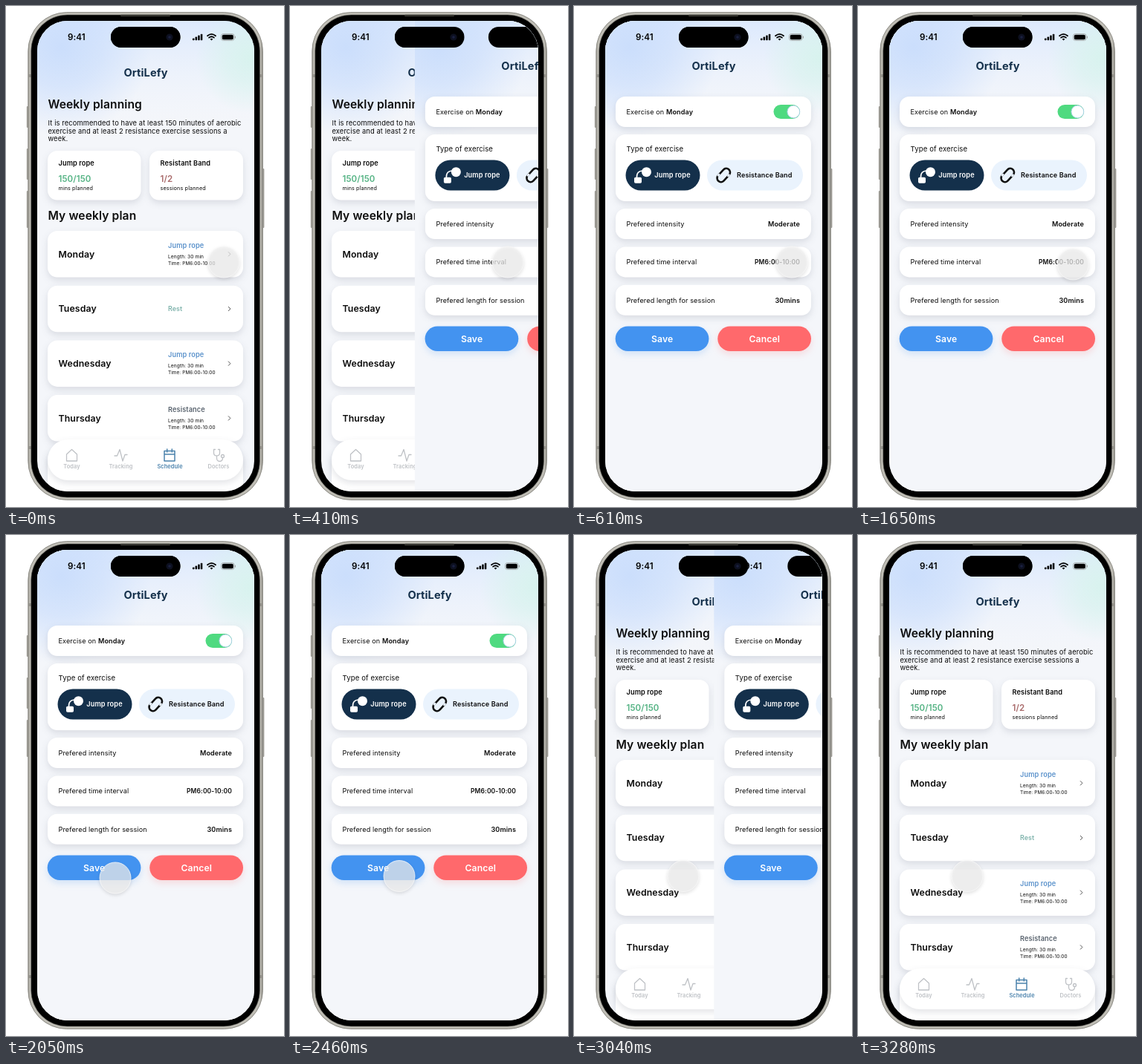
An HTML page that plays this animation: 374 px wide and 675 px high, repeating every 4.53 s.

```html
<!DOCTYPE html>
<html lang="en">
<head>
<meta charset="utf-8">
<title>Weekly exercise planner</title>
<style>
html, body { margin: 0; width: 100%; height: 100%; overflow: hidden; background: #fff; }
svg { display: block; font-family: Inter, "Open Sans", sans-serif; letter-spacing: .1px; }
.card { fill: #fff; filter: drop-shadow(0 4px 5px rgba(40, 50, 70, .13)); }
.line { fill: none; stroke-linecap: round; stroke-linejoin: round; }
#cursor { filter: drop-shadow(0 2px 2px rgba(0, 0, 0, .15)); }
</style>
</head>
<body>
<svg id="stage" width="374" height="675" viewBox="0 0 374 675"></svg>
<script>
const LOOP = 4530, STEP = 40, WIDTH = 292;
const NAVY = '#14304b', GREY = '#bfc2c6', BLUE = '#4b82ac';

const rect = (x, y, w, h, r, fill, extra = '') =>
  `<rect x="${x}" y="${y}" width="${w}" height="${h}" rx="${r}" fill="${fill}" ${extra}/>`;
const card = (x, y, w, h, r = 13) => rect(x, y, w, h, r, '#fff', 'class="card"');
const line = (d, color, width) =>
  `<path class="line" d="${d}" stroke="${color}" stroke-width="${width}"/>`;
const text = (x, y, s, size, weight = 400, fill = '#0c0c0c', anchor = 'start') =>
  `<text x="${x}" y="${y}" font-size="${size}" font-weight="${weight}" fill="${fill}" text-anchor="${anchor}">${s}</text>`;

const island = rect(141, 28, 93.5, 28, 14, '#000');

function backdrop() {
  return rect(42, 20, WIDTH, 634, 0, '#f4f6fa') +
    ['top', 'blue', 'mint'].map(id => rect(42, 20, WIDTH, 200, 0, `url(#${id})`)).join('');
}

function statusBar() {
  const bars = [0, 1, 2, 3].map(i =>
    rect(251 + i * 3.6, 43.4 - i * 1.9, 2.5, 2.8 + i * 1.9, .8, '#000')).join('');
  const wifi = line('M271 40.2Q276.5 35.6 282 40.2M273.1 42.6Q276.5 39.9 279.9 42.6', '#000', 1.8) +
    '<path d="M274.6 44.4Q276.5 43 278.4 44.4L276.5 46.4Z"/>';
  const battery = rect(289.6, 37.6, 17.4, 8.8, 2.7, 'none', 'stroke="#999" stroke-width=".8"') +
    rect(290.8, 38.8, 15, 6.4, 1.7, '#000') + rect(307.8, 40.6, 1, 2.8, .5, '#999');
  return text(83, 46, '9:41', 11.6, 600, '#000') + bars + wifi + battery + island;
}

const title = y => text(188, y, 'OrtiLefy', 14.6, 700, NAVY, 'middle');

function dayRow([day, kind, color], i) {
  const y = 303 + i * 73.7;
  const plan = kind === 'Rest'
    ? text(218, y + 34.5, kind, 8.9, 600, color)
    : text(218, y + 23, kind, 9.2, 600, color) +
      text(218, y + 36.5, 'Length: 30 min', 6.6) +
      text(218, y + 46, 'Time: PM6:00-10:00', 6.4);
  return card(56, y, 263, 62.5) + text(70.5, y + 35.6, day, 12.3, 600) + plan +
    line(`M299.3 ${y + 28.6}l2.6 2.7l-2.6 2.7`, '#555', 1);
}

function navBar() {
  const house = 'M81.5 604L88.5 597.5L95.5 604V613H81.5Z';
  const pulse = 'M146 606H149.5L153 597.5L157 613L160 604.5H163';
  const calendar = 'M213 599.5H227V613H213ZM213 604H227M216.7 597V601M223.3 597V601';
  const scope = 'M281.5 597.5H279.5V602Q279.5 606 283.5 606Q287.5 606 287.5 602V597.5H285.5' +
    'M283.5 606V609Q283.5 613.5 287.5 613.5Q291.5 613.5 291.5 608.5';
  return card(56, 584, 263, 55, 27.5) +
    line(house, GREY, 1.3) + line(pulse, GREY, 1.3) + line(calendar, BLUE, 1.5) + line(scope, GREY, 1.3) +
    `<circle cx="291.5" cy="606.5" r="2" fill="none" stroke="${GREY}" stroke-width="1.3"/>` +
    [['Today', 88.5], ['Tracking', 154.5], ['Schedule', 220.5], ['Doctors', 286]].map(([s, x]) =>
      text(x, 623.4, s, 7.4, 600, s === 'Schedule' ? BLUE : GREY, 'middle')).join('');
}

function weekScreen() {
  const intro = ['It is recommended to have at least 150 minutes of aerobic',
    'exercise and at least 2 resistance exercise sessions a', 'week.'];
  const days = [['Monday', 'Jump rope', '#5b92cb'], ['Tuesday', 'Rest', '#7fb3ac'],
    ['Wednesday', 'Jump rope', '#5b92cb'], ['Thursday', 'Resistance', '#58626d']];
  return backdrop() + statusBar() + title(95) +
    text(56.5, 138, 'Weekly planning', 15.6, 600) +
    intro.map((s, i) => text(56.5, 161 + i * 10.6, s, 9.35)).join('') +
    card(56, 195, 125.5, 66.5) + card(193, 195, 126, 66.5) +
    text(70.5, 215, 'Jump rope', 9.2, 600) + text(207.5, 215, 'Resistant Band', 9.2, 600) +
    text(70.5, 237, '150/150', 11.5, 600, '#55b384') + text(207.5, 237, '1/2', 11.5, 600, '#a96a6a') +
    text(70.5, 248.3, 'mins planned', 7.2) + text(207.5, 248.3, 'sessions planned', 7.3) +
    text(56.5, 288, 'My weekly plan', 15.6, 600) +
    days.map(dayRow).join('') + card(56, 597.8, 263, 62.5) + navBar();
}

function button(x, label, fill) {
  return rect(x, 431.5, 125.7, 33.5, 16.75, fill, `style="filter:drop-shadow(0 4px 5px ${fill}33)"`) +
    text(x + 63, 452.5, label, 12.2, 600, '#fff', 'middle');
}

function editScreen() {
  const fields = [['intensity', 'Moderate', 9.1], ['time interval', 'PM6:00-10:00', 8.5],
    ['length for session', '30mins', 9.1]];
  const rope = '<circle cx="97.5" cy="223.7" r="6.5" fill="#fff"/>' + rect(81, 230.8, 10, 8, 1.8, '#fff') +
    line('M84.5 231Q84 222 93 222', '#fff', 1.6);
  const band = '<g transform="translate(201.3 228) rotate(42)">' +
    rect(-5.2, -10.5, 10.4, 21, 5.2, 'none', 'stroke="#111" stroke-width="2.6"') +
    line('M-5.2 3.5V5M5.2 -5V-3.5', '#eaf3fd', 2.8) + '</g>';
  return backdrop() + statusBar() + title(86) +
    card(56, 122, 263, 41) +
    text(70.5, 145.6, 'Exercise on <tspan font-weight="600">Monday</tspan>', 9.1) +
    rect(268.5, 133, 35.5, 19, 9.5, '#4fda80') +
    '<circle cx="295.3" cy="142.5" r="8.4" fill="#fff" stroke="#a5cfe4"/>' +
    card(56, 173, 263, 90) + text(70.5, 196.4, 'Type of exercise', 9.6) +
    rect(69.5, 207.5, 100, 41, 20.5, NAVY) + rect(179, 207.5, 129, 41, 20.5, '#eaf3fd') +
    rope + band +
    text(108.3, 231.2, 'Jump rope', 9.2, 600, '#fff') + text(219, 231.2, 'Resistance Band', 9.1, 600) +
    fields.map(([name, value, size], i) => {
      const y = 273 + i * 51.4;
      return card(56, y, 263, 41) + text(70.5, y + 23.7, 'Prefered ' + name, 9.15) +
        text(304, y + 23.7, value, size, 600, '#0c0c0c', 'end');
    }).join('') +
    button(55.7, 'Save', '#4393f0') + button(193.3, 'Cancel', '#ff696c');
}

function phoneBody() {
  const side = (x, y, h) => rect(x, y, 2, h, 1, '#a09e97');
  const band = (x, y) => rect(x, y, 4, 4, 0, '#95938c');
  return side(27.8, 135, 29) + side(27.8, 192, 42) + side(27.8, 249, 50) + side(345.4, 219, 80) +
    rect(29.8, 8.6, 315.6, 656.8, 52, 'url(#metal)', 'stroke="#85847d" stroke-width=".9"') +
    band(30, 92) + band(341, 92) + band(30, 593) + band(341, 593) +
    rect(33.8, 12, 307.6, 650, 48.5, '#000', 'stroke="#55544f" stroke-width=".6"') +
    rect(154, 11.8, 67, 2.4, 1.2, '#35342f');
}

const radial = (id, cx, cy, r, color) =>
  `<radialGradient id="${id}" gradientUnits="userSpaceOnUse" cx="${cx}" cy="${cy}" r="${r}">
    <stop stop-color="${color}"/><stop offset=".45" stop-color="${color}" stop-opacity=".65"/>
    <stop offset="1" stop-color="${color}" stop-opacity="0"/></radialGradient>`;

document.getElementById('stage').innerHTML = `<defs>
  <clipPath id="glass">${rect(42, 20, WIDTH, 634, 41, '#000')}</clipPath>
  <linearGradient id="top" x2="0" y2="1"><stop stop-color="#dce9fd"/>
    <stop offset=".7" stop-color="#eef3fc" stop-opacity="0"/></linearGradient>
  <linearGradient id="metal"><stop stop-color="#9b9991"/><stop offset=".008" stop-color="#bfbdb5"/>
    <stop offset=".99" stop-color="#bfbdb5"/><stop offset="1" stop-color="#8d8b84"/></linearGradient>
  ${radial('blue', 75, 55, 120, '#cbdefc')}${radial('mint', 330, 70, 75, '#d8f3ee')}</defs>
  ${phoneBody()}
  <g clip-path="url(#glass)">${weekScreen()}<g id="edit">${editScreen()}</g></g>
  ${island}<circle cx="220" cy="42" r="4.6" fill="#0d1020"/><circle cx="220" cy="42" r="1.8" fill="#1b2140"/>
  <g id="cursor"><circle r="21" fill="#f0f0f0" fill-opacity=".72" stroke="#f8f8f8" stroke-opacity=".8"/></g>`;

// Cubic bezier easing with end heights 0 and 1, solved by bisection.
function ease(x, x1, x2) {
  if (x <= 0) return 0;
  if (x >= 1) return 1;
  let lo = 0, hi = 1, u;
  for (let i = 0; i < 24; i++) {
    u = (lo + hi) / 2;
    const v = 1 - u;
    if (3 * v * v * u * x1 + 3 * v * u * u * x2 + u * u * u < x) lo = u; else hi = u;
  }
  return u * u * (3 - 2 * u);
}

const snap = (t, start) => start + Math.floor((t - start) / STEP) * STEP;
const slide = (t, start) => ease((t - start) / 300, 0, .58);

function editOffset(t) {
  if (t < 330) return WIDTH;
  if (t < 2960) return WIDTH * (1 - slide(snap(t, 330), 290.5));
  return WIDTH * slide(snap(t, 2960), 2937);
}

function cursorAt(t) {
  if (t >= 2460) return [147, 459.5];
  const p = t < 1650 ? 0 : ease((snap(t, 1650) - 1600) / 440, .42, .58);
  return [293 - 146 * p, 345 + 117 * p];
}

const edit = document.getElementById('edit'), cursor = document.getElementById('cursor');

function draw() {
  const t = performance.now() % LOOP;
  edit.setAttribute('transform', `translate(${editOffset(t)} 0)`);
  cursor.setAttribute('transform', `translate(${cursorAt(t)})`);
  requestAnimationFrame(draw);
}
draw();
</script>
</body>
</html>
```
